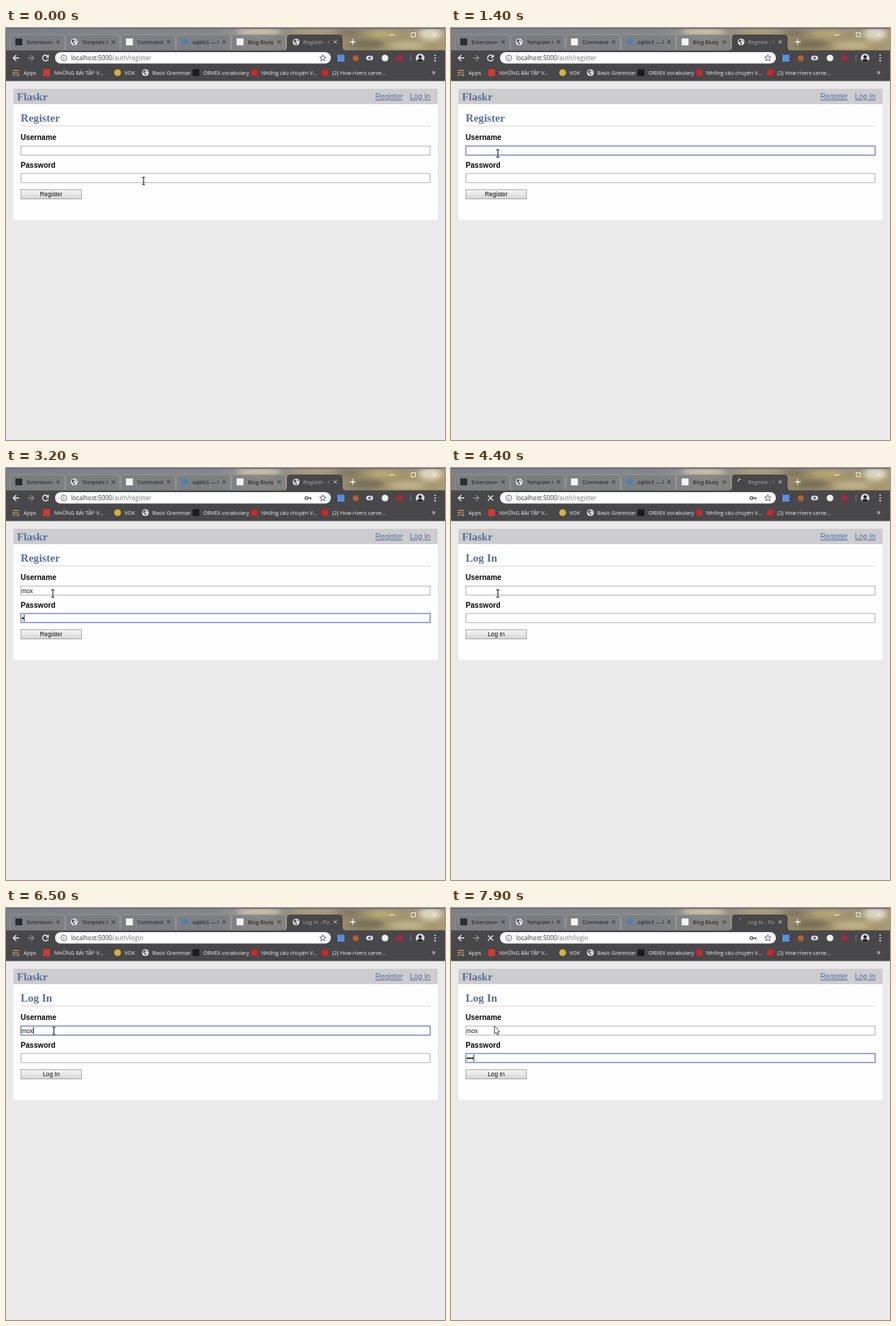
Recreate the animation shown at these times as an HTML page. Size 600 by 563 pixels, loop 8 s.

```html
<!DOCTYPE html>
<html lang="en">
<head>
<meta charset="utf-8">
<title>Register - Flaskr</title>
<style>
  html, body { margin: 0; width: 100%; height: 100%; overflow: hidden; background: #ebeaeb; }
  svg { display: block; width: 600px; height: 563px; }
  svg svg { width: auto; height: auto; }
  text { white-space: pre; }
  .ui { font-family: "Open Sans", "Noto Sans", sans-serif; font-size: 7.35px; }
  .sans { font-family: "Liberation Sans", Arial, sans-serif; font-size: 10.1px; }
  .head { font: bold 15.1px "Liberation Serif", serif; fill: #5570a0; }
  .label { font-weight: bold; fill: #080808; }
  .link { fill: #5872a0; text-decoration: underline; }
  .small { font-size: 8.3px; fill: #111; }
  .line { fill: none; stroke: #f2f2f2; stroke-width: 1.3; }
  .field { fill: #fff; stroke: #b0afb1; }
  .focus { stroke: #7385d0; stroke-width: 1.4; }
</style>
</head>
<body>
<svg viewBox="0 0 600 563">
  <defs>
    <linearGradient id="sky">
      <stop offset="0" stop-color="#7d8184"/>
      <stop offset=".48" stop-color="#858788"/>
      <stop offset=".58" stop-color="#a39d8c"/>
      <stop offset=".68" stop-color="#8c8471"/>
      <stop offset=".82" stop-color="#9a8d68"/>
      <stop offset="1" stop-color="#a99a73"/>
    </linearGradient>
    <linearGradient id="btn" x2="0" y2="1">
      <stop offset="0" stop-color="#f7f7f7"/>
      <stop offset="1" stop-color="#d6d5d7"/>
    </linearGradient>
    <filter id="soft" x="-50%" y="-50%" width="200%" height="200%"><feGaussianBlur stdDeviation="3.5"/></filter>
    <clipPath id="strip"><rect width="600" height="31"/></clipPath>
    <clipPath id="cut"><rect y="-13" width="35.5" height="20"/></clipPath>
    <g id="globe">
      <circle r="4.6" fill="#f3f3f3"/>
      <path d="M-3.6-1.4Q-2-3.6.4-3.4L.8-1.8-1.2-.8-.4.8 1.4 1 .8 3.4-.4 3.8-1 1.6-3 .4ZM2-2.6 3.4-1 2.6 0 1.6-1Z" fill="#4d4d4f"/>
    </g>
    <path id="cross" d="M-2.3-2.3 2.3 2.3M2.3-2.3-2.3 2.3"/>
  </defs>

  <rect width="600" height="563" fill="#ebeaeb"/>

  <g clip-path="url(#strip)">
    <rect width="600" height="31" fill="url(#sky)"/>
    <g id="clouds" filter="url(#soft)"></g>
    <rect width="600" height="1.3" fill="#5865a4"/>
  </g>
  <g id="tabs" class="ui"></g>
  <path d="M378 31Q384 31 384 26V14Q384 9 389 9H455Q460 9 460 14V26Q460 31 466 31Z" fill="#48474a"/>
  <rect y="30.5" width="600" height="42" fill="#48474a"/>
  <use id="favicon" href="#globe" x="396.5" y="19"/>
  <path id="spinner" fill="none" stroke="#d0d0d0" stroke-width="1.3"/>
  <g transform="translate(406 22)" clip-path="url(#cut)"><text id="title" class="ui" fill="#a9a8aa"></text></g>
  <use href="#cross" x="450" y="19" stroke="#c4c4c4"/>
  <path class="line" d="M470 19H478M474 15V23"/>
  <g class="line" style="stroke-width:1">
    <path d="M524 9.5H531"/><rect x="554" y="6.5" width="5.5" height="5.5"/><use href="#cross" x="585" y="9"/>
  </g>

  <path class="line" d="M18 41H10M14 37 10 41 14 45"/>
  <path class="line" d="M30 41H38M34 37 38 41 34 45" style="stroke:#8c8b8d"/>
  <g id="reload">
    <path class="line" d="M57 38.3A4 4 0 1 0 57.8 42.3"/>
    <path d="M58.5 36V40.4H54Z" fill="#f2f2f2"/>
  </g>
  <path id="stop" class="line" d="M50.5 37.5 57.5 44.5M57.5 37.5 50.5 44.5"/>
  <rect x="67" y="33" width="377" height="15.6" rx="7.8" fill="#fdfdfd"/>
  <circle cx="79" cy="41" r="3.9" fill="none" stroke="#666" stroke-width=".9"/>
  <path d="M79 40.4V43.2M79 38.6V39.5" stroke="#666"/>
  <text class="ui" x="89" y="44" style="font-size:8.3px" fill="#333">localhost:5000<tspan id="path" fill="#777"></tspan></text>
  <g id="key">
    <circle cx="410.6" cy="41" r="1.9" fill="none" stroke="#555" stroke-width="1.4"/>
    <path d="M412.5 41H417.5M416.3 41V43.2" stroke="#555" stroke-width="1.5"/>
  </g>
  <path d="M433 36.7 434.2 39.6 437.3 39.8 434.9 41.8 435.7 44.8 433 43.1 430.3 44.8 431.1 41.8 428.7 39.8 431.8 39.6Z" fill="none" stroke="#555" stroke-width=".9"/>

  <rect x="453" y="36.5" width="9.5" height="9.5" fill="#5b8ee0"/>
  <circle cx="478" cy="41.2" r="4" fill="#b8602e"/>
  <ellipse cx="497" cy="41" rx="4.8" ry="3.3" fill="#dce3e8"/><circle cx="497" cy="41" r="1.9" fill="#577080"/>
  <circle cx="518" cy="41" r="4.6" fill="#ececec"/>
  <circle cx="538" cy="41" r="4.6" fill="#a02c38"/>
  <path d="M553.5 36V46" stroke="#777"/>
  <circle cx="566" cy="41" r="6" fill="#d9d9d9"/>
  <path d="M562 45.4Q562 42.2 566 42.2T570 45.4Q566 48 562 45.4Z" fill="#222"/><circle cx="566" cy="39.5" r="2.3" fill="#222"/>
  <path d="M586.5 36.5V46" stroke="#eee" stroke-width="1.8" stroke-dasharray="1.8 2"/>

  <g id="marks" class="ui" fill="#f0f0f0"></g>

  <rect x="10" y="83" width="580" height="21" fill="#cdccce"/>
  <rect x="10" y="104" width="580" height="158.3" fill="#fefefe"/>
  <text class="head" x="15" y="99">Flaskr</text>
  <g class="sans link"><text x="504.8" y="97">Register</text><text x="552" y="97">Log In</text></g>
  <text id="heading" class="head" x="20" y="128"></text>
  <path d="M20 134H580" stroke="#d5d4d6"/>
  <g class="sans label"><text x="20" y="153">Username</text><text x="20" y="191">Password</text></g>
  <rect id="userBox" x="20.3" y="161.3" width="559.4" height="12.4"/>
  <rect id="passBox" x="20.3" y="198.8" width="559.4" height="12.4"/>
  <text id="user" class="sans small" x="21" y="170.5"></text>
  <g id="dots" fill="#111"><circle cx="23" cy="205.2" r="1.3"/><circle cx="26" cy="205.2" r="1.3"/><circle cx="29" cy="205.2" r="1.3"/></g>
  <rect id="caret" width="1" height="9.4" fill="#111"/>
  <rect x="20.4" y="220.9" width="82.8" height="12.6" fill="url(#btn)" stroke="#a5a4a6"/>
  <text id="button" class="sans small" x="61.8" y="230" text-anchor="middle"></text>

  <path id="beam" d="M-2.2-5H-.6L0-4.4.6-5H2.2M0-4.4V4.4M-2.2 5H-.6L0 4.4.6 5H2.2" fill="none" stroke="#222" stroke-width="1.1"/>
  <path id="arrow" d="M59.3 161.3V172L61.7 169.8 63.4 173.6 65.1 172.8 63.5 169.2H66.6Z" fill="#fff" stroke="#333" stroke-width=".9"/>
</svg>
<script>
  const $ = id => document.getElementById(id);
  const LOOP = 8000, STEP = 100, BLINK = 530;
  const NAME = 'mox';

  // x, y, rx, ry, colour
  $('clouds').innerHTML = [
    [345, 5, 30, 6, '#c9c0a6'], [420, 4, 32, 4, '#b7a87d'], [492, 22, 24, 6, '#766e58'],
    [515, 8, 22, 5, '#bba772'], [548, 24, 26, 5, '#c3b58f'], [580, 8, 16, 9, '#ddd5bd'], [470, 7, 14, 4, '#7d745c']
  ].map(([x, y, rx, ry, c]) => `<ellipse cx="${x}" cy="${y}" rx="${rx}" ry="${ry}" fill="${c}"/>`).join('');

  const square = (x, y, c, s = 9.4) => `<rect x="${x - s / 2}" y="${y - s / 2}" width="${s}" height="${s}" fill="${c}"/>`;
  const disc = (x, y, c) => `<circle cx="${x}" cy="${y}" r="4.6" fill="${c}"/>`;
  const globe = (x, y) => `<use href="#globe" x="${x}" y="${y}"/>`;

  const tabs = [
    ['Extensions — Flask', (x, y) => square(x, y, '#2b2d2e')],
    ['Template Inheritance', globe],
    ['Command Line', (x, y) => square(x, y, '#f4f4f4')],
    ['sqlite3 — DB-API', (x, y) => disc(x, y, '#4f7fae')],
    ['Blog Blueprint', (x, y) => square(x, y, '#f4f4f4')]
  ];
  $('tabs').innerHTML = tabs.map(([name, icon], i) => {
    const x = 6 + i * 75.6;
    return `<path d="M${x} 30.5V13Q${x} 9 ${x + 4} 9H${x + 70}Q${x + 74} 9 ${x + 74} 13V30.5Z" fill="#7b7e80" fill-opacity=".75" stroke="#a0a2a2" stroke-width=".7"/>`
      + icon(x + 11.5, 19)
      + `<g transform="translate(${x + 22} 22)" clip-path="url(#cut)"><text fill="#181818">${name}</text></g>`
      + `<use href="#cross" x="${x + 65.2}" y="19" stroke="#2e2e2e"/>`;
  }).join('');

  const apps = x => [0, 1, 2, 3, 4, 5, 6, 7, 8].map(i =>
    square(x - 3.2 + i % 3 * 3.2, 58 + (i / 3 | 0) * 3.2, ['#d66b5c', '#d9b75a', '#7fae83'][(i + (i / 3 | 0)) % 3], 2)).join('');
  const marks = [
    [13.5, 24, 'Apps', apps],
    [55.5, 66, 'NHỮNG BÀI TẬP V...', x => square(x, 61, '#d03a30')],
    [152.5, 162, 'VOK', x => disc(x, 61, '#d9b23c')],
    [190.5, 200, 'Basic Grammar', x => globe(x, 61)],
    [259.5, 270, 'ORVEX vocabulary', x => square(x, 61, '#1c1c1c')],
    [339.5, 349, 'Những câu chuyện V...', x => square(x, 61, '#d8232a', 8)],
    [436, 446, '(2) How rivers carve...', x => square(x, 61, '#d8232a', 8)]
  ];
  $('marks').innerHTML = marks.map(([ix, tx, name, icon]) =>
    icon(ix) + `<text x="${tx}" y="63.8">${name}</text>`).join('')
    + '<text x="582" y="64" style="font-size:10px">»</text>';

  // Each step overrides part of the state; focus and typing restart the caret blink.
  const steps = [
    [0, { page: 'Register', url: 'register', tab: 'Register', chars: 0, dots: 0, focus: '', key: false, load: false, arrow: false }],
    [800, { focus: 'user' }],
    [2000, { chars: 1 }], [2200, { chars: 2 }], [2400, { chars: 3 }],
    [2900, { focus: 'pass' }],
    [3200, { dots: 1, key: true }], [3400, { dots: 2 }], [3500, { dots: 3 }],
    [3800, { load: true }],
    [4200, { page: 'Log In', chars: 0, dots: 0, focus: '' }],
    [4600, { url: 'login', tab: 'Log In', key: false, load: false }],
    [5600, { focus: 'user' }],
    [6000, { chars: 1 }], [6200, { chars: 2 }], [6400, { chars: 3 }],
    [6900, { focus: 'pass' }],
    [7100, { dots: 1, key: true }], [7300, { dots: 2 }], [7400, { dots: 3 }],
    [7800, { load: true, arrow: true }]
  ];

  const moves = [[100, 900, 188, 209, 64, 171.5], [4900, 5300, 64, 171.5, 65.5, 168]];
  function cursorAt(t) {
    const [a, b, x0, y0, x1, y1] = moves[t < moves[1][0] ? 0 : 1];
    const p = Math.min(1, Math.max(0, (t - a) / (b - a)));
    const e = p * p * (3 - 2 * p);
    return [x0 + (x1 - x0) * e, y0 + (y1 - y0) * e];
  }

  function arc(age) {
    const end = -100 - (age - 100) * .72, start = end - Math.min(70, age * .16);
    const at = deg => [396.5 + 4.2 * Math.cos(deg * Math.PI / 180), 19 + 4.2 * Math.sin(deg * Math.PI / 180)];
    return `M${at(start)}A4.2 4.2 0 0 1 ${at(end)}`;
  }

  const show = (id, on) => $(id).style.display = on ? '' : 'none';
  const write = (id, s) => { if ($(id).textContent !== s) $(id).textContent = s; };

  function render(t) {
    const s = {};
    let typed = 0, loaded = 0;
    for (const [at, change] of steps) {
      if (at > t) break;
      Object.assign(s, change);
      if (change.focus || change.chars || change.dots) typed = at;
      if (change.load) loaded = at;
    }
    write('title', s.tab + ' - Flaskr');
    write('path', '/auth/' + s.url);
    write('heading', s.page);
    write('button', s.page);
    write('user', NAME.slice(0, s.chars));
    [...$('dots').children].forEach((d, i) => d.style.display = i < s.dots ? '' : 'none');
    for (const f of ['user', 'pass']) $(f + 'Box').setAttribute('class', 'field' + (s.focus === f ? ' focus' : ''));

    show('key', s.key);
    show('stop', s.load);
    show('reload', !s.load);
    show('favicon', !s.load);
    show('spinner', s.load);
    if (s.load) $('spinner').setAttribute('d', arc(t - loaded));

    show('caret', s.focus && (t - typed) % (2 * BLINK) < BLINK);
    const inPass = s.focus === 'pass';
    $('caret').setAttribute('x', inPass ? 21.3 + s.dots * 3.1 : 21.2 + (s.chars ? $('user').getComputedTextLength() : 0));
    $('caret').setAttribute('y', inPass ? 200.3 : 162.8);

    show('beam', !s.arrow);
    show('arrow', s.arrow);
    $('beam').setAttribute('transform', `translate(${cursorAt(t)})`);
  }

  const began = performance.now();
  function tick() {
    const t = (performance.now() - began) % LOOP;
    render(Math.floor(t / STEP) * STEP);
    requestAnimationFrame(tick);
  }
  render(0);
  tick();
</script>
</body>
</html>
```
